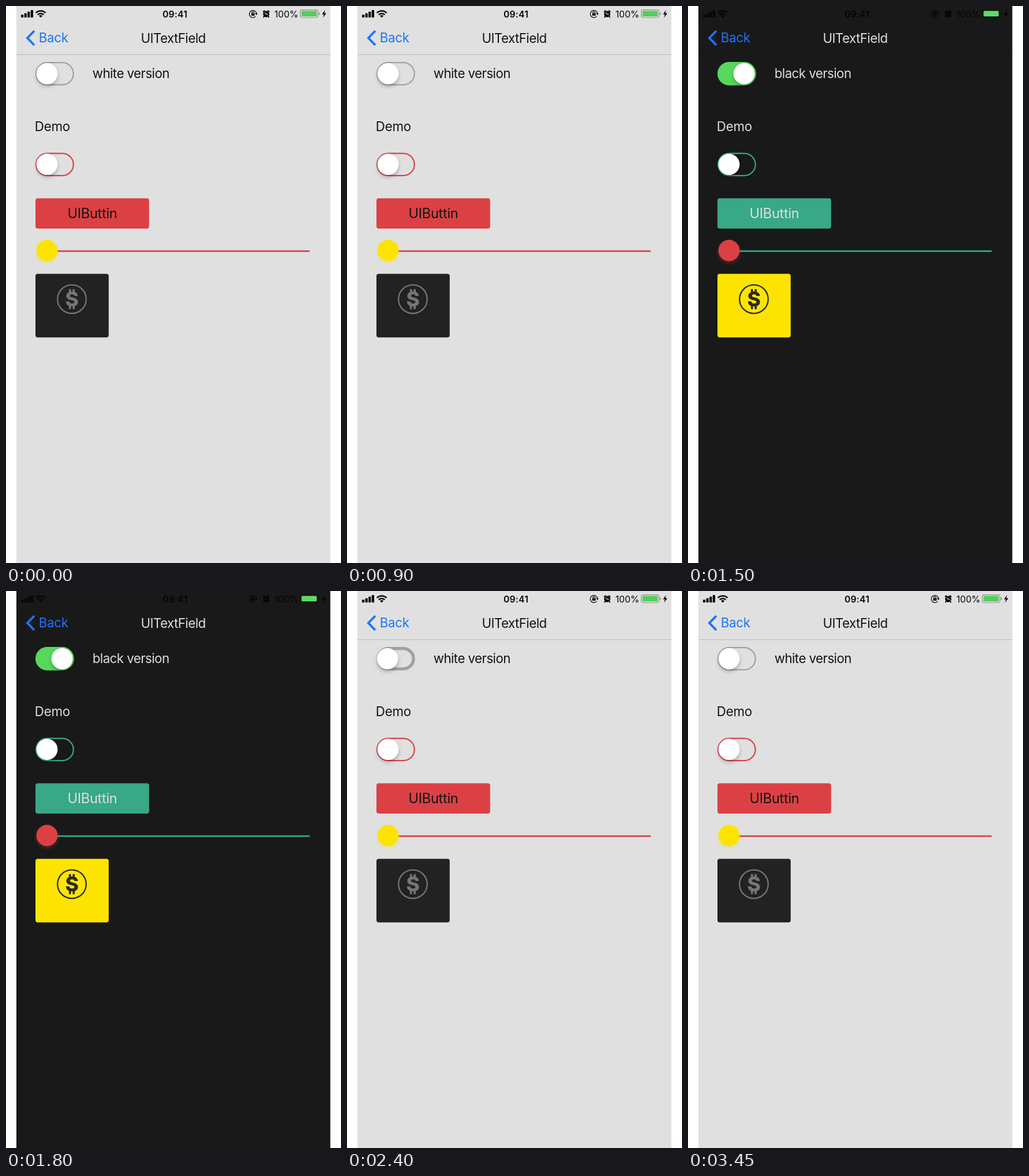
Animation, 580 px wide and 966 px high, one loop 3.6 s. Source, as an HTML page:

```html
<!DOCTYPE html>
<html lang="en">
<head>
<meta charset="utf-8">
<title>Theme switch</title>
<style>
html, body { margin: 0; width: 100%; height: 100%; overflow: hidden; background: #fff; }
svg {
  display: block;
  --bg: #e0e0e0; --text: #141414; --link: #1b75f7; --status: #060606; --line: #b9b9b9;
  --accent: #db4144; --track: #d04446; --thumb: #fde300; --card: #222; --coin: #757577;
  --off: #a1a1a1; --battery: #8b8b8b; --charge: #50cf58;
  font: 22.3px Inter, sans-serif; letter-spacing: -.55px; fill: var(--text);
}
svg.dark {
  --bg: #191919; --text: #dedede; --link: #2272f6; --status: #050505; --line: #151515;
  --accent: #38a887; --track: #38a887; --thumb: #db4144; --card: #fde400; --coin: #2b2b29;
  --battery: #101010; --charge: #5cdc60;
}
.status { fill: var(--status); font-size: 15.7px; letter-spacing: 0; }
.outline { fill: none; stroke: var(--status); }
.link { fill: var(--link); }
.accent { fill: var(--accent); }
.ring { fill: none; stroke-width: 2.2px; x: 52.1px; width: 64.6px; height: 38.6px; rx: 19.3px; }
.knob { fill: #fff; filter: drop-shadow(0 4px 3px rgba(0, 0, 0, .24)); }
.thumb { fill: var(--thumb); filter: drop-shadow(0 3px 3px color-mix(in srgb, var(--thumb) 35%, transparent)); }
.coin { fill: var(--coin); }
#ring { stroke: var(--off); y: 98.1px; }
#knob { cx: 71px; }
.dark #ring { stroke: #57d85c; fill: #57d85c; }
.dark #knob { cx: 97px; }
.settling #ring { stroke-width: 5.4px; x: 53.7px; y: 99.7px; width: 61.4px; height: 35.4px; rx: 17.7px; }
.settling #knob { cx: 70px; }
</style>
</head>
<body>
<svg id="stage" width="580" height="966" viewBox="0 0 580 966">
  <rect x="18" width="543.5" height="966" style="fill:var(--bg)"/>

  <g class="status">
    <rect x="26" y="15" width="4.2" height="5" rx="1"/>
    <rect x="31.6" y="12.6" width="4.2" height="7.4" rx="1"/>
    <rect x="37.2" y="9.8" width="4.2" height="10.2" rx="1"/>
    <rect x="42.8" y="7" width="4.2" height="13" rx="1"/>
    <path class="outline" stroke-width="2.5" d="M51.7 11.9a11.8 11.8 0 0 1 16.8 0M54.9 15.2a7.3 7.3 0 0 1 10.4 0"/>
    <path d="M57.2 17.2a4.2 4.2 0 0 1 5.8 0L60.1 20.2z"/>
    <text x="292.5" y="19.5" text-anchor="middle" font-weight="600" letter-spacing=".2">09:41</text>
    <path class="outline" stroke-width="1.3" d="M432.2 17.9a6.2 6.2 0 1 1 1.5-4.4M425.7 13v-1.3a1.8 1.8 0 0 1 3.6 0V13"/>
    <path d="M431.2 12.8h4.6l-2.3 3zM424.6 12.8h5.8v4h-5.8z"/>
    <circle cx="450.5" cy="14" r="5.4"/>
    <path class="outline" stroke-width="2" stroke-linecap="round" d="M445.6 9.8l1.8-1.6M455.4 9.8l-1.8-1.6M446.9 18.2l-.9 1.1M454.1 18.2l.9 1.1"/>
    <path d="M447.7 11.6l2.9 2.7h3" style="fill:none;stroke:var(--bg)" stroke-width="1.2"/>
    <text x="464.7" y="19.5">100%</text>
    <rect x="509.6" y="6.6" width="30.4" height="13.4" rx="3.2" style="fill:none;stroke:var(--battery)" stroke-width="1.2"/>
    <rect x="511.7" y="8.6" width="26.2" height="9.4" rx="1.6" style="fill:var(--charge)"/>
    <path d="M541.5 11q2 .6 2 2.4t-2 2.4z" style="fill:var(--battery)"/>
    <path d="M552.3 7l-5.2 7.4h3.3l-1.6 5.8 5.8-7.8h-3.5z"/>
  </g>

  <path d="M49 43.2L37 55.5 49 67.8" fill="none" style="stroke:var(--link)" stroke-width="3.8"/>
  <text class="link" x="56.8" y="63.3" letter-spacing="-.3">Back</text>
  <text x="289.5" y="63.6" text-anchor="middle">UITextField</text>
  <rect x="18" y="84" width="543.5" height="1" style="fill:var(--line)"/>

  <rect id="ring" class="ring"/>
  <circle id="knob" class="knob" cy="117.5" r="18.4"/>
  <text id="label" x="149.7" y="125.2"></text>

  <text x="49.8" y="217.3" letter-spacing="-.2">Demo</text>
  <rect class="ring" y="255.6" style="stroke:var(--accent)"/>
  <circle class="knob" cx="71" cy="274.7" r="18.4"/>

  <rect class="accent" x="51" y="333.6" width="196.8" height="52.4" rx="4"/>
  <text x="149.5" y="368.3" text-anchor="middle" font-size="23.6" letter-spacing="-.3">UIButtin</text>

  <rect x="60" y="423.8" width="466" height="2.6" rx="1.3" style="fill:var(--track)"/>
  <circle class="thumb" cx="71" cy="424" r="18.4"/>

  <rect x="51" y="464.6" width="126.8" height="110.2" rx="4" style="fill:var(--card)"/>
  <g class="coin">
    <circle cx="114" cy="508.4" r="24.8" fill="none" style="stroke:var(--coin)" stroke-width="2.3"/>
    <text x="114.2" y="521.4" text-anchor="middle" font-size="35.5" font-weight="800" letter-spacing="0">S</text>
    <path d="M108.9 491h3.6v6h-3.6zM115.4 491h3.6v6h-3.6zM108.9 520h3.6v5.8h-3.6zM115.4 520h3.6v5.8h-3.6z"/>
  </g>
</svg>
<script>
const LOOP = 3600, DARK_FROM = 1500, DARK_TO = 2400, SETTLE = 150;
const stage = document.getElementById('stage');
const label = document.getElementById('label');

function render(now) {
  const t = now % LOOP;
  const dark = t >= DARK_FROM && t < DARK_TO;
  stage.classList.toggle('dark', dark);
  stage.classList.toggle('settling', t >= DARK_TO && t < DARK_TO + SETTLE);
  label.textContent = dark ? 'black version' : 'white version';
}

function tick() {
  render(performance.now());
  requestAnimationFrame(tick);
}
tick();
</script>
</body>
</html>
```
